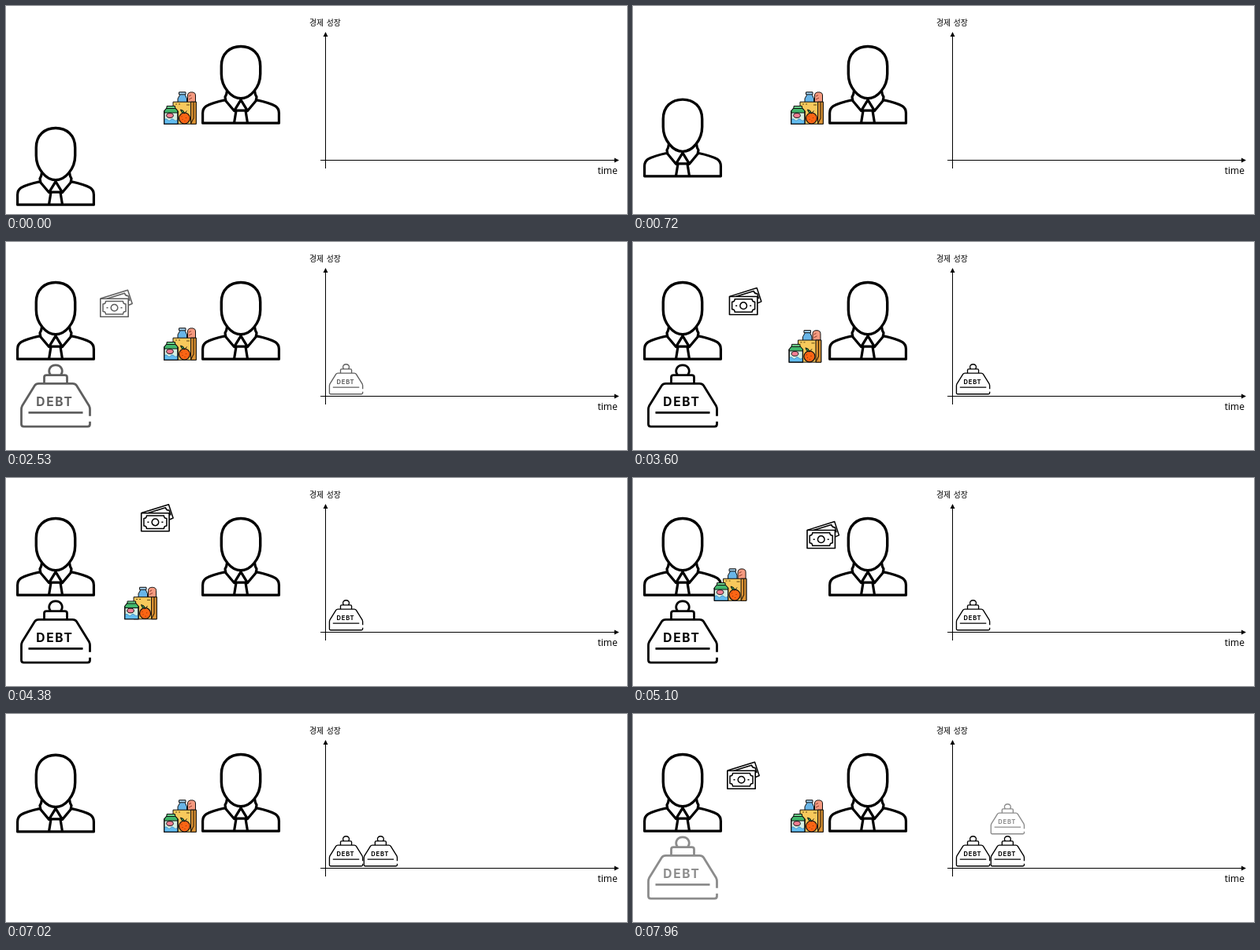
An HTML page with a canvas that plays this animation: 788 by 265 pixels, repeating every 8 s.

```html
<!DOCTYPE html>
<html lang="ko">
<head>
<meta charset="utf-8">
<title>Debt and growth</title>
<style>
html, body { margin: 0; width: 100%; height: 100%; overflow: hidden; background: #fff; }
canvas { display: block; width: 788px; height: 265px; }
</style>
</head>
<body>
<canvas id="stage"></canvas>
<script>
const W = 788, H = 265, LOOP = 8000;
const canvas = document.getElementById('stage');
const ctx = canvas.getContext('2d');
const dpr = window.devicePixelRatio || 1;
canvas.width = W * dpr;
canvas.height = H * dpr;

const HEAD = new Path2D('M38.3 76.5C38.3 60.5 49 51.5 63 51.5S87.7 60.5 87.7 76.5V86.5C87.7 103.5 75 117.8 63 117.8S38.3 103.5 38.3 86.5Z');
const SUIT = new Path2D(
  'M43.5 119.6C34 121.6 25 124 19 127.6Q14.6 130.6 14.6 136.5V149.2H111.4V136.5Q111.4 130.6 107 127.6C101 124 92 121.6 82.5 119.6' +
  'M45.5 108Q45 113 43 116L44 121L54.5 133.6L63 119.6L71.5 133.6L82 121L83 116Q81 113 80.5 108' +
  'M56 133.2H70M57 133.6L54.5 149M69 133.6L71.5 149');

// Debt weight, 90 x 82
const WEIGHT = new Path2D(
  'M39 14.5C34 8.5 38 1.5 45 1.5S56 8.5 51 14.5' +
  'M30.5 25V17Q30.5 14.3 33.5 14.3H56.5Q59.5 14.3 59.5 17V25' +
  'M88.5 73.5V77Q88.5 79.8 85.5 79.8H4.5Q1.5 79.8 1.5 77V58Q1.5 55.5 2.5 53.5L18.5 27.5Q20 25 23.5 25H66.5Q70 25 71.5 27.5L87.5 53.5Q88.5 55.5 88.5 58V66.5' +
  'M10.5 62H79.5');

// Banknotes, 42 x 36
const BACK_NOTE = new Path2D('M1 12L35.5 1.2L41.2 18.5L36.5 20.5M9 12.2L31.5 5.2Q32.5 8.8 36 8.5L38 15');
const FRONT_NOTE = new Path2D('M.8 12.2H36.2V35.2H.8Z');
const NOTE_TRIM = new Path2D(
  'M7.5 15.5H29.5Q29.5 19 33 19V28.5Q29.5 28.5 29.5 32H7.5Q7.5 28.5 4 28.5V19Q7.5 19 7.5 15.5Z' +
  'M22.8 23.8A4.3 4.3 0 1 1 14.2 23.8A4.3 4.3 0 1 1 22.8 23.8M8.5 23.8H10.5M26.5 23.8H28.5');

const clamp = v => Math.min(1, Math.max(0, v));
const span = (t, start, length) => clamp((t - start) / length);
const smooth = p => (1 - Math.cos(Math.PI * p)) / 2;

function ink(alpha) {
  const v = Math.round(255 * (1 - alpha));
  return `rgb(${v},${v},${v})`;
}

function at(x, y, scale, draw) {
  ctx.save();
  ctx.translate(x, y);
  ctx.scale(scale, scale);
  draw();
  ctx.restore();
}

function shape(path, fill, color = '#111', width = 1) {
  const p = typeof path === 'string' ? new Path2D(path) : path;
  if (fill) {
    ctx.fillStyle = fill;
    ctx.fill(p);
  }
  ctx.strokeStyle = color;
  ctx.lineWidth = width;
  ctx.stroke(p);
}

function label(text, x, y, font, color = '#000', spacing = 0, gap = 0) {
  ctx.font = font;
  ctx.letterSpacing = spacing + 'px';
  ctx.wordSpacing = gap + 'px';
  ctx.fillStyle = color;
  ctx.fillText(text, x, y);
}

function person(dx, dy) {
  at(dx, dy, 1, () => {
    shape(SUIT, null, '#000', 3.2);
    shape(HEAD, '#fff', '#000', 3.4);
  });
}

function weight(x, y, scale, alpha) {
  if (alpha <= 0) return;
  at(x, y, scale, () => {
    shape(WEIGHT, null, ink(alpha), 2.8);
    label('DEBT', 20.3, 54, '700 15.5px Inter, sans-serif', ink(alpha), 1.7);
  });
}

function money(x, y, alpha) {
  if (alpha <= 0) return;
  const color = ink(alpha);
  at(x, y, 1, () => {
    shape(BACK_NOTE, null, color, 1.5);
    shape(FRONT_NOTE, '#fff', color, 1.6);
    shape(NOTE_TRIM, null, color, 1.5);
  });
}

// Grocery bag, 42 x 42
function groceries(x, y) {
  at(x, y, 1, () => {
    shape('M20.5 1H27.5V4.5L29.5 9V16H18V9L20.5 4.5Z', '#68b5e8');
    shape('M19.5 .8H28V3.8H19.5Z', '#a5d3f2');
    shape('M30.5 15V5Q30.5 .8 35.5 .8T40.5 5V15Z', '#f59a80');
    shape('M32 6L35 4.5M32 10L36 8', null, '#8e3c2c');
    shape('M12 13.2H41.3V41.3H12Z', '#f8c95c');
    shape('M34.5 13.2H41.3V41.3H34.5Z', '#dd9434');
    shape('M38 13.2V34L34.5 41', null, '#2d1c08', 1.1);
    shape('M15 16H17M19 16H21M29 17H33', null, '#5d4412');
    shape('M.7 25L4 21H14.5L18 25V41.3H.7Z', '#d5efe3', '#111', 1.2);
    shape('M.7 25L4 21H14.5L18 25V27H.7Z', '#42b86c');
    shape('M4 18.5H14.5V21.5H4Z', '#6bd08a');
    shape('M.9 36Q3 33.5 5 36T9 36T13 36T17.8 36V41H.9Z', '#62bdf0', '#2f80b5', .7);
    shape('M12.3 30.5A4.3 2.9 0 1 1 3.7 30.5A4.3 2.9 0 1 1 12.3 30.5', '#f27f94');
    shape('M.7 25V41.3H18V25', null, '#111', 1.2);
    shape('M33.5 34A7 7 0 1 1 19.5 34A7 7 0 1 1 33.5 34', '#fb6514', '#111', 1.2);
    shape('M26.5 28Q26 23.5 21.5 23Q22 27.5 26.5 28L29.5 24.5', '#3c9b4c');
    shape('M24 35V35.8M28.5 33V33.8M27 37.2V38M23 31.5V32.3', null, '#7c2606', 1.1);
  });
}

function chart() {
  ctx.fillStyle = '#000';
  ctx.fillRect(405, 37, 1, 170);
  ctx.fillRect(399, 196, 375, 1);
  ctx.fill(new Path2D('M405.5 33L408.5 39H402.5ZM778 196.5L772 199.5V193.5Z'));
  label('경제 성장', 385, 25, '9.8px "Noto Sans CJK KR", "Noto Sans CJK", sans-serif', '#000', 0, 1.5);
  label('time', 750.7, 214, '12px "Open Sans", "Noto Sans", sans-serif');
}

const FIRST = 60, SWAP = 3400, SECOND = 5470;

function render(t) {
  ctx.setTransform(dpr, 0, 0, dpr, 0, 0);
  ctx.fillStyle = '#fff';
  ctx.fillRect(0, 0, W, H);
  ctx.lineJoin = 'round';
  ctx.lineCap = 'butt';

  const second = t >= SECOND;
  const rise = smooth(span(t, second ? SECOND : FIRST, 1640));
  const debt = second ? span(t, 7560, 890) : span(t, 1980, 880);
  const cash = second ? span(t, 7560, 400) : debt;
  const swap = second ? 0 : smooth(span(t, SWAP, 2000));
  const arc = 4 * swap * (1 - swap);

  chart();
  weight(409.7, 155, 0.485, second ? 1 : debt);
  if (second) {
    weight(453.5, 155, 0.485, span(t, SECOND, 820));
    weight(453.5, 114, 0.485, debt);
  }

  person(0, 104 * (1 - rise));
  person(235, 0);
  weight(18, 155.3, 1, debt);
  money(119 + 107 * swap, 60 - 27.5 * arc, cash);
  groceries(200 - 103 * swap, 109 + 29.5 * arc);
}

const begin = performance.now();
function tick() {
  render((performance.now() - begin) % LOOP);
  requestAnimationFrame(tick);
}
render(0);
requestAnimationFrame(tick);
</script>
</body>
</html>
```
